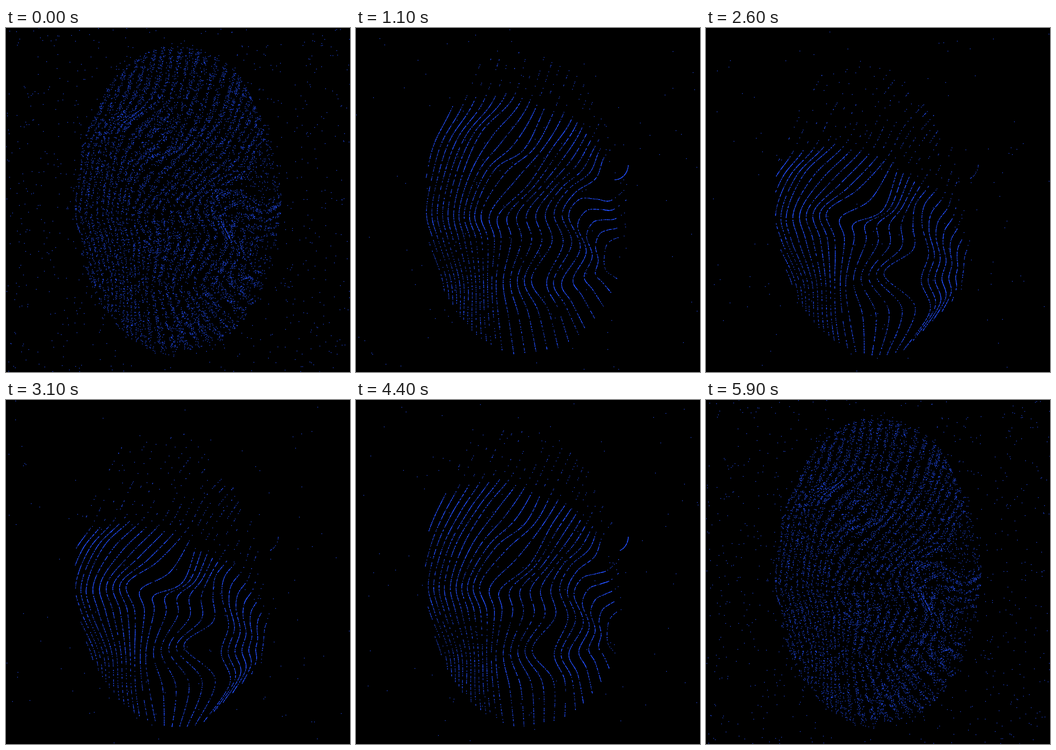
An HTML page with a canvas for the animation above (6 s loop, 748 by 748 pixels).

```html
<!DOCTYPE html>
<html lang="en">
<head>
<meta charset="utf-8">
<title>Drifting contour particles</title>
<style>
  html, body { margin: 0; width: 100%; height: 100%; overflow: hidden; background: #000; }
  canvas { display: block; width: 748px; height: 748px; }
</style>
</head>
<body>
<canvas id="stage" width="748" height="748"></canvas>
<script>
const SIZE = 748, STEP_MS = 100, STEPS = 60;
const ctx = document.getElementById('stage').getContext('2d');

// Guide strands: line number, then points from top to bottom; lines between are blended.
const early = [
  [-2, 220,70, 165,180, 143,250, 139,310, 128,400, 145,460, 175,550, 180,630, 180,715],
  [6, 360,36, 340,145, 262,215, 233,310, 221,400, 232,460, 248,550, 246,630, 240,715],
  [10, 440,50, 400,182, 359,262, 298,294, 263,400, 277,460, 280,550, 282,630, 288,715],
  [13, 500,85, 470,190, 428,248, 370,320, 305,400, 313,460, 305,550, 309,630, 316,715],
  [20, 575,235, 543,265, 523,312, 470,342, 434,392, 458,460, 409,552, 440,605, 505,680],
  [21, 605,355, 560,383, 520,365, 478,354, 448,392, 479,470, 428,555, 455,600, 520,675],
  [25, 590,450, 570,452, 550,455, 537,465, 532,490, 532,510, 540,525, 560,533, 585,542]
];
const late = [
  [-2, 200,110, 150,210, 115,290, 100,340, 92,400, 110,460, 158,550, 180,630, 200,715],
  [5, 390,70, 330,160, 286,245, 215,315, 176,400, 185,460, 220,550, 225,630, 232,715],
  [11, 475,165, 430,215, 395,280, 330,351, 263,400, 280,460, 280,550, 282,630, 295,715],
  [13, 495,190, 458,235, 420,300, 385,395, 322,425, 322,460, 304,550, 312,630, 328,715],
  [18, 520,270, 505,310, 480,350, 455,385, 450,430, 450,482, 387,535, 455,608, 410,710],
  [19, 535,260, 520,300, 505,345, 475,385, 470,430, 484,490, 468,550, 487,615, 430,700],
  [25, 580,455, 572,465, 568,480, 563,495, 561,510, 560,525, 558,540, 556,555, 555,575]
];

function seeded(seed) {
  let a = seed * 7919 + 17;
  return () => {
    a = (a + 0x6D2B79F5) | 0;
    let t = Math.imul(a ^ (a >>> 15), 1 | a);
    t = (t + Math.imul(t ^ (t >>> 7), 61 | t)) ^ t;
    return ((t ^ (t >>> 14)) >>> 0) / 2 ** 32;
  };
}

const mix = (a, b, k) => a + (b - a) * k;
const mixPoint = (p, q, k) => [mix(p[0], q[0], k), mix(p[1], q[1], k)];
const clamp = (x, lo, hi) => Math.max(lo, Math.min(hi, x));
const distance = (p, q) => Math.hypot(p[0] - q[0], p[1] - q[1]);
const inOval = (x, y) => ((x - 374) / 224) ** 2 + ((y - 375) / 337) ** 2 <= 1;

// Catmull-Rom point on one strand, s from 0 to 8.
function along(strand, s) {
  const i = Math.min(7, Math.floor(s)), t = s - i;
  const axis = k => {
    const at = n => strand[1 + 2 * clamp(n, 0, 8) + k];
    const a = at(i - 1), b = at(i), c = at(i + 1), d = at(i + 2);
    return b + t * (c - a + t * (2 * a - 5 * b + 4 * c - d + t * (3 * (b - c) + d - a))) / 2;
  };
  return [axis(0), axis(1)];
}

function locate(strands, line, s) {
  const v = clamp(line, -2, 25);
  let i = 1;
  while (strands[i][0] < v) i++;
  const a = strands[i - 1], b = strands[i];
  return mixPoint(along(a, s), along(b, s), (v - a[0]) / (b[0] - a[0]));
}

// Particles are spread evenly over the area, then assigned to their line.
function makeParticles(count) {
  const rand = seeded(5), list = [];
  while (list.length < count) {
    const line = Math.floor(rand() * 28) - 2;
    const s = rand() * 10.4 - 2.4;
    const from = clamp(s, 0, 7.9);
    const gap = Math.min(28, distance(locate(early, line - .5, from), locate(early, line + .5, from)));
    const run = distance(locate(early, line, from), locate(early, line, from + .1));
    const weight = gap * run / 260 * (s < 0 ? .15 : 1);
    if (rand() < weight) list.push({ line, s, offset: rand() - .5, pull: .3 + 2.7 * rand() });
  }
  return list;
}

const particles = makeParticles(9200);
const blobs = [[340, 240], [560, 310], [487, 392], [342, 462], [490, 550], [558, 488], [400, 650]];
const dot = (x, y) => ctx.fillRect(x - .7, y - .7, 1.45, 1.45);
const dotInside = (x, y) => { if (inOval(x, y)) dot(x, y); };

function drawLines(u) {
  const blend = clamp((u - 6) / 18, 0, 1);
  for (const p of particles) {
    const s = p.s + u * .08;
    if (s < 0 || s > 8) continue;
    const v = p.line + p.offset * Math.exp(-p.pull * (u + .4));
    dotInside(...mixPoint(locate(early, v, s), locate(late, v, s), blend));
  }
}

// Short arc of gathered dots circling near the right edge.
function drawArc(u) {
  const rand = seeded(9), middle = Math.max(.4, 1.9 - u * .1);
  const count = 70 * clamp(u / 6, 0, 1) * clamp((27 - u) / 10, .2, 1);
  for (let i = 0; i < count; i++) {
    const angle = middle + (rand() - .5) * 1.5;
    dotInside(562 + 30 * Math.cos(angle), 297 + 33 * Math.sin(angle));
  }
}

function drawStrays(u) {
  const rand = seeded(100 + u);
  const count = 120 + 880 * Math.exp(-u / 1.5);
  for (let i = 0; i < count; i++) dot(rand() * SIZE, rand() * SIZE);
  const perBlob = 85 * Math.exp(-u / 2.2);
  for (const [cx, cy] of blobs) {
    for (let i = 0; i < perBlob; i++) {
      const angle = rand() * Math.PI * 2, radius = 46 * Math.sqrt(rand());
      dotInside(cx + radius * Math.cos(angle), cy + radius * Math.sin(angle));
    }
  }
}

let shown = -1;
function frame() {
  const step = Math.floor(performance.now() / STEP_MS) % STEPS;
  const u = Math.min(step, STEPS - 1 - step);
  if (u !== shown) {
    shown = u;
    ctx.fillStyle = '#000';
    ctx.fillRect(0, 0, SIZE, SIZE);
    ctx.fillStyle = '#2450ff';
    drawLines(u);
    drawArc(u);
    drawStrays(u);
  }
  requestAnimationFrame(frame);
}
frame();
</script>
</body>
</html>
```
